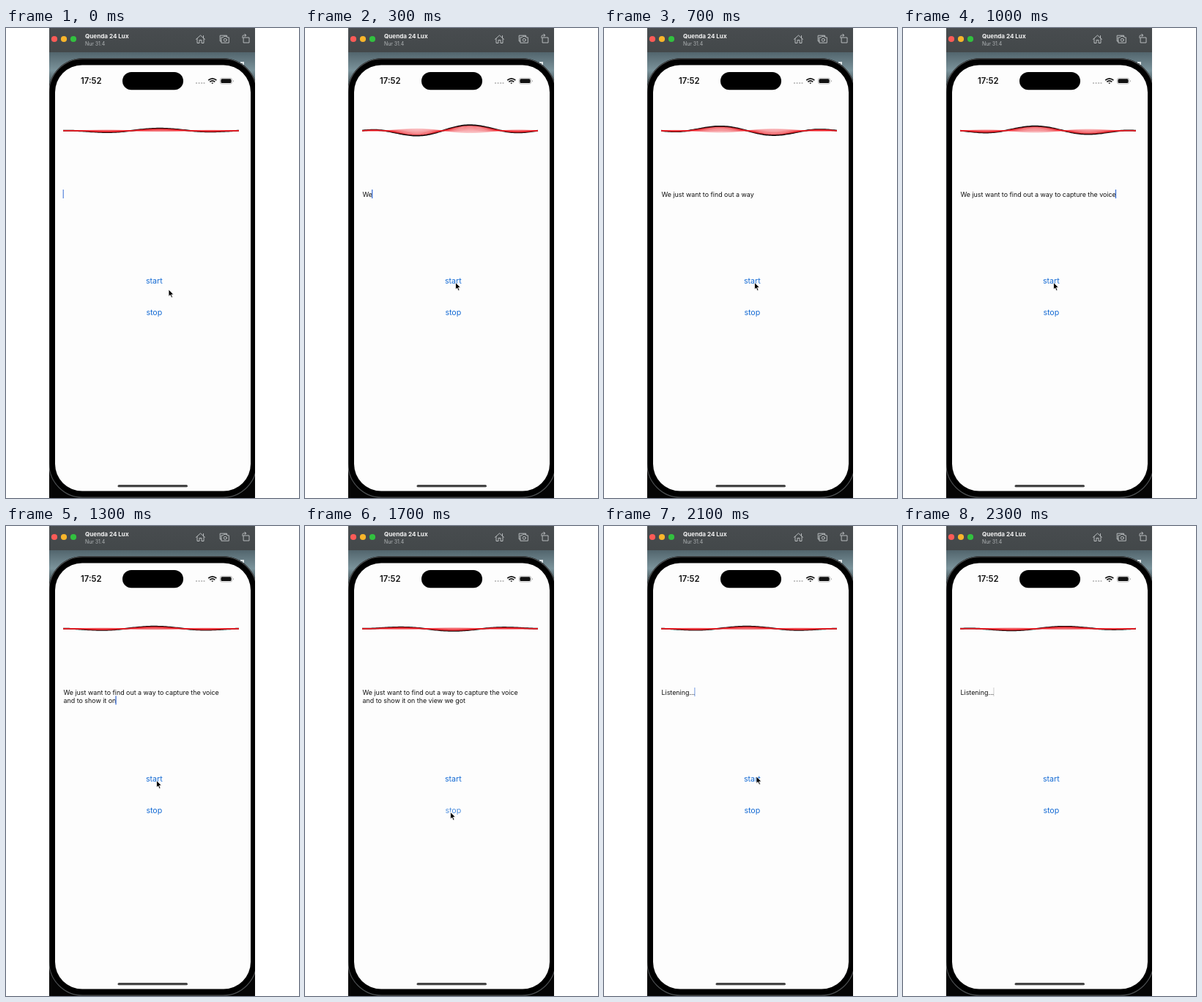
Recreate the animation shown at these times as an HTML page. Size 400x640 px, loop 2400 ms.

```html
<!DOCTYPE html>
<html lang="en">
<head>
<meta charset="utf-8">
<title>Voice capture</title>
<style>
  html, body { margin: 0; width: 100%; height: 100%; overflow: hidden; background: #fff; }
  svg { display: block; font-family: Inter, "Liberation Sans", sans-serif; }
  .icon { fill: none; stroke: #c3c7c9; stroke-width: .9; stroke-linejoin: round; stroke-linecap: round; }
  .button { font-size: 10.6px; text-anchor: middle; fill: #1269d3; }
  .note { font-size: 8.88px; fill: #111; }
</style>
</head>
<body>
<svg width="400" height="640" viewBox="0 0 400 640">
  <defs>
    <clipPath id="window"><rect x="59" width="281" height="640"/></clipPath>
    <linearGradient id="desk" x2="0" y2="1">
      <stop stop-color="#52656d"/><stop offset=".5" stop-color="#7b939b"/><stop offset="1" stop-color="#30383b"/>
    </linearGradient>
    <linearGradient id="bar" x2="0" y2="1">
      <stop stop-color="#484c4f"/><stop offset="1" stop-color="#43484a"/>
    </linearGradient>
  </defs>
  <g clip-path="url(#window)">
    <rect x="59" width="281" height="640" fill="#050505"/>
    <rect x="59" y="33" width="281" height="50" fill="url(#desk)"/>
    <path d="M320 46h5v4h-2v-2h-3z" fill="#dfe5e7"/>
    <rect x="58" y="41" width="285" height="599" rx="47" fill="#000"/>
    <rect x="58.8" y="41.8" width="283.4" height="597.4" rx="46" fill="none" stroke="#4c4f51" stroke-width="1.2"/>
    <rect x="67" y="50.5" width="267" height="580" rx="37" fill="#fdfdfd"/>
    <rect x="59" width="281" height="33" fill="url(#bar)"/>
    <circle cx="66" cy="15" r="4.1" fill="#fc5b57"/>
    <circle cx="79" cy="15" r="4.1" fill="#f9b52b"/>
    <circle cx="92" cy="15" r="4.1" fill="#32c13f"/>
  </g>
  <text x="108" y="14" font-size="8.1" font-weight="700" fill="#f2f2f2">Quenda 24 Lux</text>
  <text x="108" y="23.6" font-size="6.9" fill="#b2b6b8">Nur 31.4</text>
  <g class="icon">
    <path d="M259.5 15.3l6-5.3 6 5.3M261 14.5V20.5h3v-4h3v4h3V14.5M269.5 10.5v2.6"/>
    <path d="M294 18h-1.8V10.2h9.4v1.5M294.3 12.8h2.2l1-1.5h3.4l1 1.5h2.4v7.4h-10z"/>
    <circle cx="299.3" cy="16.3" r="2"/>
    <path d="M324.5 13h7.5v7h-7.5zM323 13.5v-2.2q0-1.4 1.4-1.4h3M326 8.3l1.8 1.6-1.8 1.6"/>
  </g>

  <text x="102" y="76.3" font-size="11.3" font-weight="600" fill="#111">17:52</text>
  <rect x="159" y="60" width="83" height="24.3" rx="12.15"/>
  <g fill="#b5b5b5">
    <circle cx="260" cy="75" r="1.1"/><circle cx="263.6" cy="75" r="1.1"/>
    <circle cx="267.2" cy="75" r="1.1"/><circle cx="270.5" cy="75" r="1.1"/>
  </g>
  <g fill="none" stroke="#111" stroke-width="1.7">
    <path d="M276.2 71.2q5.6-4.8 11.2 0M278.3 73.4q3.5-2.9 7 0"/>
    <path d="M280.2 74.6h3.2l-1.6 1.7z" fill="#111" stroke="none"/>
  </g>
  <rect x="292.3" y="68.2" width="16.4" height="8" rx="2.5" fill="none" stroke="#aaa" stroke-width=".7"/>
  <rect x="293.4" y="69.3" width="14.2" height="5.8" rx="1.6" fill="#111"/>
  <path d="M310 71v2.5q1-.3 1-1.25t-1-1.25z" fill="#aaa"/>
  <rect x="152.5" y="622" width="95.5" height="3.3" rx="1.65" fill="#454545"/>

  <g id="waves" fill="none"></g>
  <text class="note" id="line1" x="78.5" y="229.6"></text>
  <text class="note" id="line2" x="78.5" y="240.9"></text>
  <rect id="caret" width="1.3" height="12" fill="#3f73d8"/>
  <text class="button" x="202.3" y="347.7">start</text>
  <text class="button" id="stop" x="202.3" y="390.8">stop</text>
  <path id="pointer" d="M0 0V9.6l2.2-2 1.6 3.6 1.7-.7-1.6-3.5h3z" stroke="#fff" stroke-width=".8"/>
</svg>
<script>
  const $ = id => document.getElementById(id);
  const STEP = 100, STEPS = 24, LEFT = 78, WIDTH = 240, BASE = 139.8, WAVES = 11;
  const LINES = ["We just want to find out a way to capture the voice", "and to show it on the view we got it"];
  const words = LINES.map(s => s.split(" "));

  // Keys are [step, value, ...]
  const offsetKeys = [[0, 171], [3, 348], [7, 595], [13, 963], [17, 1203], [21, 1435], [23, 1623]];
  const levelKeys = [[0, 3], [2, 3], [3, 8], [7, 6.7], [11, 6], [13, 3], [23, 3]];
  const pointerKeys = [[0, 222, 356], [2, 205.5, 346.5], [14, 205.5, 346.5], [16, 198.5, 389.5],
                       [19, 198.5, 389.5], [21, 208, 341], [23, 208, 341]];
  // Words spoken by each step, from the third on
  const spoken = [1, 2, 4, 6, 8, 9, 10, 12, 14, 15, 17, 18, 18, 20, 21];
  const caretAlpha = [.8, .8, .5, 1, 1, .5, 0, 0, .5, 1, 1, .5, .5, 1, 1, .5, 0, 0, 0, 0, 0, .55, 1, .3];

  function at(keys, t, n = 1) {
    let i = 0;
    while (i < keys.length - 2 && t > keys[i + 1][0]) i++;
    const [a, b] = [keys[i], keys[i + 1]];
    return a[n] + (b[n] - a[n]) * (t - a[0]) / (b[0] - a[0]);
  }

  const waves = Array.from({ length: WAVES }, (_, i) => {
    const p = document.createElementNS("http://www.w3.org/2000/svg", "path");
    p.setAttribute("stroke", i ? "#ee1d25" : "#0a0a0a");
    p.setAttribute("stroke-width", i ? .66 : 2);
    p.setAttribute("stroke-opacity", Math.min(1, (1 - i / WAVES) * 2 / 3 + 1 / 3));
    return $("waves").appendChild(p);
  });

  function drawWaves(offset, level) {
    waves.forEach((wave, i) => {
      const gain = level * (1 - 1.5 * i / WAVES);
      let d = "";
      for (let x = 0; x <= WIDTH; x += 2) {
        const envelope = 1 - (2 * x / WIDTH - 1) ** 2;
        const y = BASE - gain * envelope * Math.sin(2 * Math.PI * (LEFT + x - offset) / 160);
        d += (x ? "L" : "M") + (LEFT + x) + " " + y.toFixed(2);
      }
      wave.setAttribute("d", d);
    });
  }

  function noteAt(step) {
    if (step < 2) return ["", ""];
    if (step === 2 || step > 20) return ["Listening...", ""];
    const n = step - 3 < spoken.length ? spoken[step - 3] : 99;
    const first = words[0].length;
    return [words[0].slice(0, n).join(" "), words[1].slice(0, Math.max(0, n - first)).join(" ")];
  }

  function draw(step) {
    drawWaves(at(offsetKeys, step), at(levelKeys, step));
    const note = noteAt(step);
    $("line1").textContent = note[0];
    $("line2").textContent = note[1];
    const last = note[1] ? $("line2") : $("line1");
    $("caret").setAttribute("x", 77.6 + (last.textContent && last.getComputedTextLength()));
    $("caret").setAttribute("y", note[1] ? 231.3 : 220);
    $("caret").setAttribute("opacity", caretAlpha[step]);
    $("caret").setAttribute("fill", step === 23 ? "#888" : "#3f73d8");
    $("stop").setAttribute("opacity", step === 17 ? .75 : 1);
    $("pointer").setAttribute("transform", `translate(${at(pointerKeys, step, 1)} ${at(pointerKeys, step, 2)})`);
    $("pointer").setAttribute("visibility", step > 22 ? "hidden" : "visible");
  }

  function tick() {
    draw(Math.floor(performance.now() / STEP) % STEPS);
    requestAnimationFrame(tick);
  }
  tick();
</script>
</body>
</html>
```
